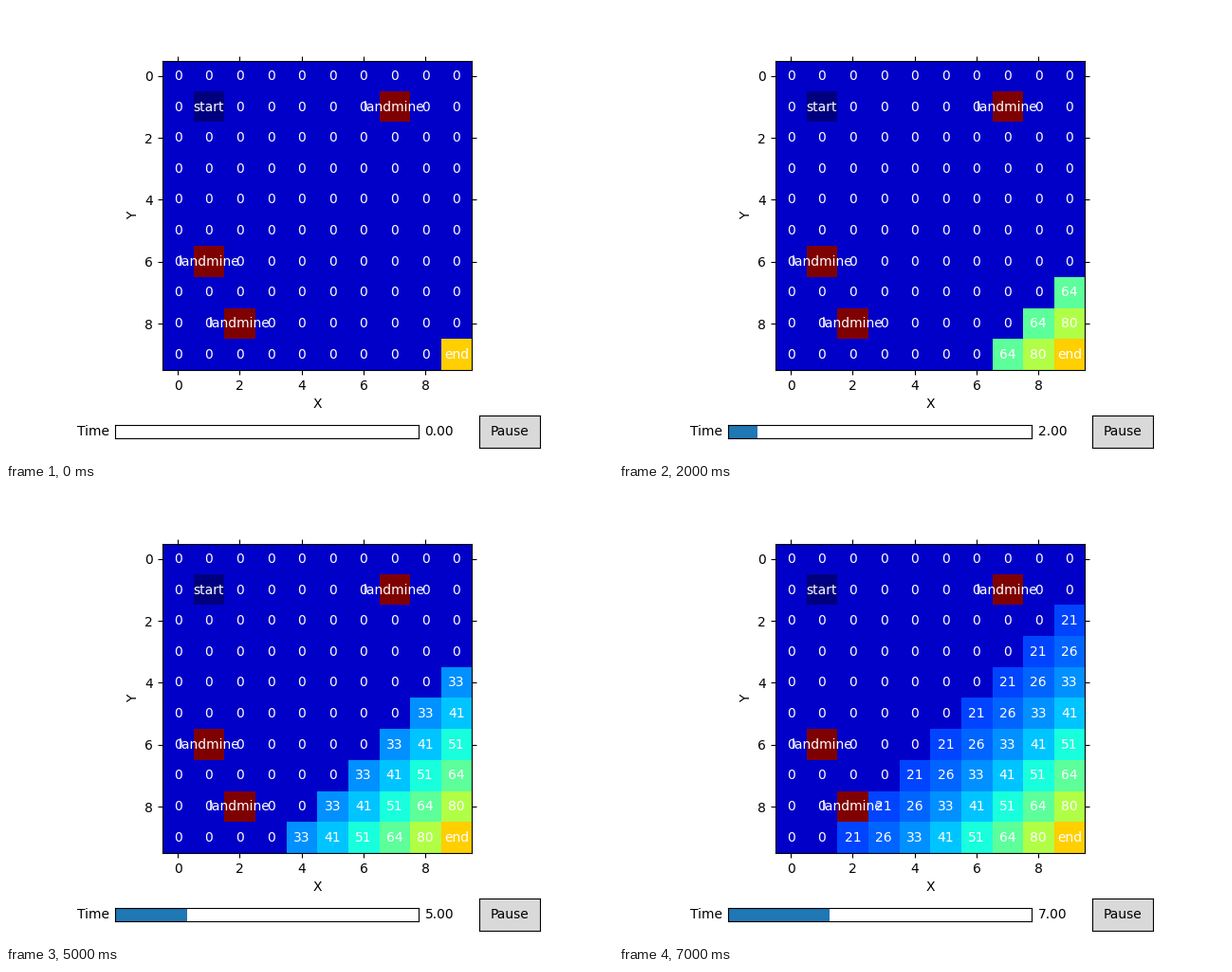
Recreate the animation shown at these times as a matplotlib script. Size 640 px wide and 480 px high, loop 8000 ms.

```python
import matplotlib.pyplot as plt
import numpy as np
from matplotlib.animation import FuncAnimation
from matplotlib.patches import Rectangle

SIZE = 10
STEPS = 8
GOAL_VALUE = 100
DISCOUNT = 0.8
TIME_MAX = 21
# (column, row): (label, colour value)
SPECIAL = {
    (1, 1): ("start", -10),
    (7, 1): ("landmine", 150),
    (1, 6): ("landmine", 150),
    (2, 8): ("landmine", 150),
    (9, 9): ("end", GOAL_VALUE),
}

rows, cols = np.indices((SIZE, SIZE))
distance = 2 * (SIZE - 1) - rows - cols


def values_at(step):
    """Discounted goal value, spread one cell further with each step."""
    grid = np.where(distance <= step, GOAL_VALUE * DISCOUNT**distance, 0.0)
    for (x, y), (_, value) in SPECIAL.items():
        grid[y, x] = value
    return grid


def control_axes(box, color):
    """Bare framed axes for a widget."""
    axes = fig.add_axes(box, facecolor=color)
    axes.set(xticks=[], yticks=[])
    return axes


fig, ax = plt.subplots(figsize=(6.4, 4.8), dpi=100)
fig.subplots_adjust(left=0.125, right=0.9, bottom=0.2, top=0.88)

image = ax.imshow(values_at(0), cmap="jet", vmin=-10, vmax=150,
                  interpolation="nearest")
ax.set(xlabel="X", ylabel="Y", xticks=range(0, SIZE, 2),
       yticks=range(0, SIZE, 2))
ax.tick_params(top=True, right=True)

numbers = {}
for y in range(SIZE):
    for x in range(SIZE):
        label = SPECIAL.get((x, y), ("0",))[0]
        text = ax.text(x, y, label, color="white", ha="center", va="center")
        if (x, y) not in SPECIAL:
            numbers[x, y] = text

slider = control_axes([0.18, 0.05, 0.5, 0.03], "white")
slider.set(xlim=(0, TIME_MAX), ylim=(0, 1))
bar = slider.add_patch(Rectangle((0, 0), 0, 1, facecolor="C0",
                                 edgecolor="none"))
slider.text(-0.02, 0.5, "Time", transform=slider.transAxes,
            ha="right", va="center")
readout = slider.text(1.02, 0.5, "0.00", transform=slider.transAxes,
                      ha="left", va="center")

button = control_axes([0.78, 0.03, 0.1, 0.07], "0.85")
button.text(0.5, 0.5, "Pause", transform=button.transAxes,
            ha="center", va="center")


def update(step):
    grid = values_at(step)
    image.set_data(grid)
    for (x, y), text in numbers.items():
        text.set_text(f"{grid[y, x]:.0f}")
    bar.set_width(step)
    readout.set_text(f"{step:.2f}")
    return [image, bar, readout, *numbers.values()]


anim = FuncAnimation(fig, update, frames=STEPS, interval=1000, repeat=True,
                     repeat_delay=0, blit=False)
plt.show()
```
